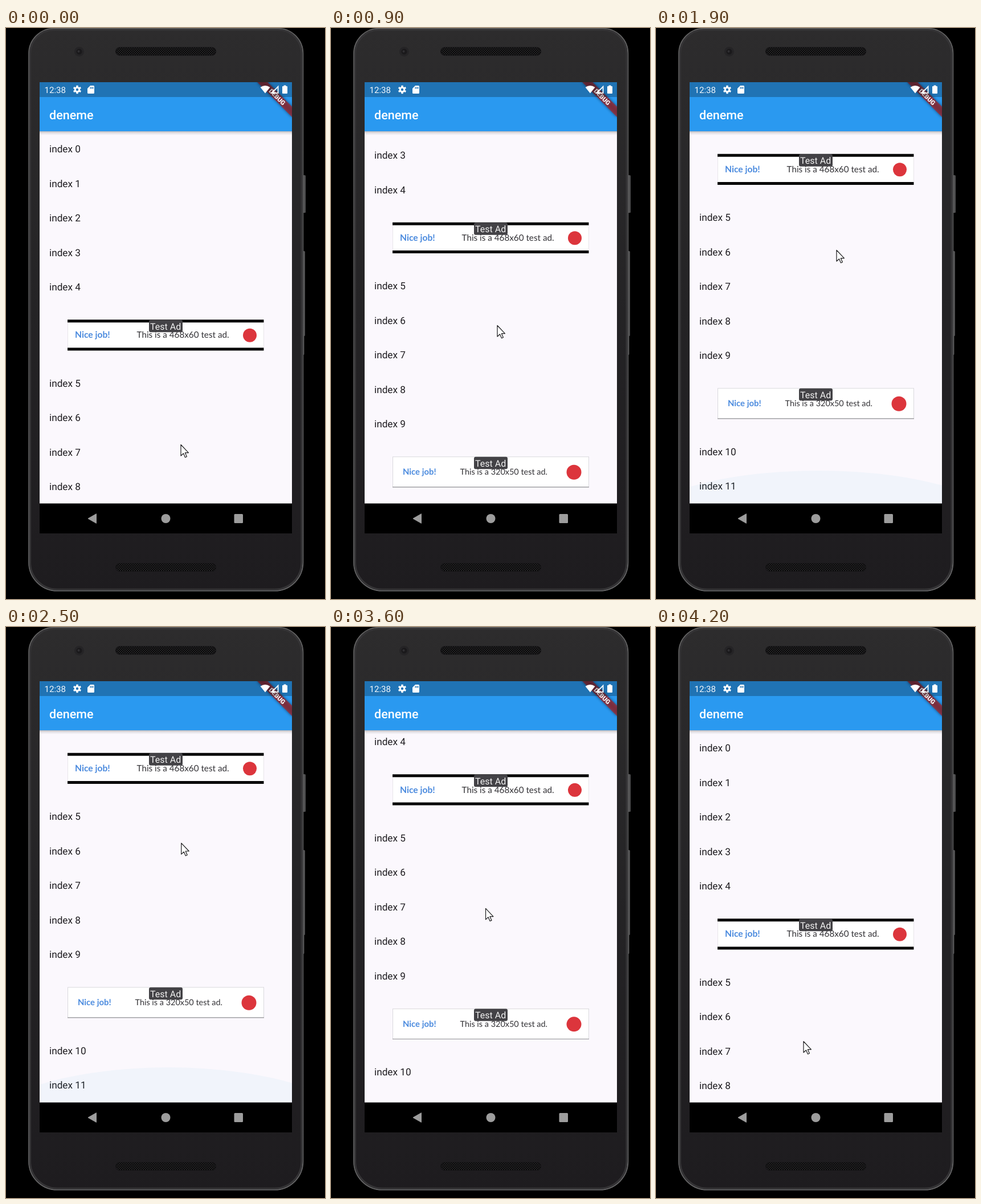
An HTML page that plays this animation: 560x1001 px, repeating every 4.3 s.

```html
<!DOCTYPE html>
<html lang="en">
<head>
<meta charset="utf-8">
<title>List with banner ads</title>
<style>
  html, body { margin: 0; width: 100%; height: 100%; overflow: hidden; background: #000; }
  svg { display: block; width: 560px; height: 1001px; }
  text { font-family: Roboto, sans-serif; text-rendering: geometricPrecision; }
  .row { font-size: 17.2px; fill: #1f1d21; }
  .ad text { font-family: Lato, sans-serif; fill: #333236; }
  .ad .nice { font-weight: 700; fill: #4a8ade; }
  .ad .tag { font: 16px Roboto, sans-serif; fill: #f2f2f2; }
</style>
</head>
<body>
<svg viewBox="0 0 560 1001">
  <defs>
    <linearGradient id="body" x2="0" y2="1">
      <stop offset="0" stop-color="#2d2c2d"/>
      <stop offset=".5" stop-color="#242325"/>
      <stop offset="1" stop-color="#1e1c1f"/>
    </linearGradient>
    <linearGradient id="rim" x2="0" y2="1">
      <stop offset="0" stop-color="#666"/>
      <stop offset=".5" stop-color="#555556"/>
      <stop offset="1" stop-color="#6c6c6d"/>
    </linearGradient>
    <linearGradient id="shade" x2="0" y2="1">
      <stop offset="0" stop-color="#000" stop-opacity=".26"/>
      <stop offset=".4" stop-color="#000" stop-opacity=".1"/>
      <stop offset="1" stop-color="#000" stop-opacity="0"/>
    </linearGradient>
    <pattern id="mesh" width="4" height="4" patternUnits="userSpaceOnUse">
      <rect width="4" height="4" fill="#252426"/>
      <circle cx="1" cy="1" r="1.15" fill="#060606"/>
      <circle cx="3" cy="3" r="1.15" fill="#060606"/>
    </pattern>
    <filter id="soft" x="-20%" y="-80%" width="140%" height="260%">
      <feGaussianBlur stdDeviation="2.4"/>
    </filter>
    <clipPath id="view"><rect x="59" y="181" width="443" height="652.500"/></clipPath>
    <clipPath id="screen"><rect x="59" y="95" width="443" height="791"/></clipPath>
  </defs>

  <rect width="560" height="1001"/>
  <g fill="#505051">
    <rect x="520" y="258" width="6" height="66" rx="1.500"/>
    <rect x="520" y="391" width="5" height="149" rx="1.500"/>
    <rect x="520" y="530" width="3.500" height="43" rx="1.500"/>
  </g>
  <path d="M84 1H478Q522 1 522 45V937Q522 987 472 987H90Q40 987 40 937V45Q40 1 84 1Z" fill="none"/>
  <path d="M84 .8h393.500a44 44 0 0 1 44 44v892a50 50 0 0 1-50 50h-381.500a50 50 0 0 1-50-50v-892a44 44 0 0 1 44-44z" fill="url(#body)" stroke="url(#rim)" stroke-width="1.600"/>
  <path d="M84 3.300h393.500a41.500 41.500 0 0 1 41.500 41.500v892a47.500 47.500 0 0 1-47.500 47.500h-381.500a47.500 47.500 0 0 1-47.500-47.500v-892a41.500 41.500 0 0 1 41.500-41.500z" fill="none" stroke="#353436" stroke-width="3"/>

  <circle cx="128.500" cy="41.500" r="8.500" fill="#252426"/>
  <circle cx="128.500" cy="41.500" r="5" fill="#1a191b"/>
  <circle cx="127.500" cy="41" r="2" fill="#302f32"/>
  <g fill="url(#mesh)" stroke="#151416" stroke-width="1.200">
    <rect x="192.500" y="34" width="176" height="14" rx="7"/>
    <rect x="192.500" y="938.500" width="176" height="14" rx="7"/>
  </g>

  <g clip-path="url(#screen)">
    <rect x="59" y="95" width="443" height="791"/>
    <rect x="59" y="181" width="443" height="652.500" fill="#fbf8fd"/>
    <g clip-path="url(#view)">
      <g id="list"></g>
      <ellipse id="glow" cx="285" rx="332" fill="#2196c0"/>
    </g>
    <rect x="59" y="181" width="443" height="7" fill="url(#shade)"/>
    <rect x="59" y="95" width="443" height="86" fill="#2a99f0"/>
    <text x="76" y="159.500" font-size="21.5" font-weight="500" fill="#fff">deneme</text>

    <g transform="translate(502 95) rotate(45)">
      <rect x="-43" y="30.200" width="86" height="12.900" fill="#000" opacity=".5" filter="url(#soft)"/>
      <rect x="-43" y="30.200" width="86" height="12.900" fill="#b71c1c" fill-opacity=".63"/>
      <text y="40.600" font-size="11" font-weight="900" text-anchor="middle" fill="#fff">DEBUG</text>
    </g>
    <rect x="59" y="95" width="443" height="26" fill="#000" fill-opacity=".25"/>

    <text x="67.500" y="114" font-size="15.1" fill="#f2f8fc">12:38</text>
    <g fill="#fff">
      <g id="gear" transform="translate(125 108)">
        <circle r="3.700" fill="none" stroke="#fff" stroke-width="3"/>
      </g>
      <path fill-rule="evenodd" d="M148 101h5.500q1.500 0 1.500 1.500v11q0 1.500-1.500 1.500h-9q-1.500 0-1.500-1.500v-7.500zM147.500 103.500v3h1.400v-3zM149.800 103.500v3h1.400v-3zM152 103.500v3h1.400v-3z"/>
      <path d="M446.500 104q8.500-6 17 0l-8.500 10.500z"/>
      <path fill-rule="evenodd" d="M478.500 100.500v14.500h-14zM476.700 105v8.200h-8z"/>
      <path d="M470.500 107v8h-6z"/>
      <path d="M487.500 100.500h4v1.500h1.500q1 0 1 1v11q0 1-1 1h-7q-1 0-1-1v-11q0-1 1-1h1.500z"/>
    </g>

    <g fill="#9d9d9d">
      <path d="M144 860l14.500-8.300v16.600z" stroke="#9d9d9d" stroke-linejoin="round"/>
      <circle cx="280.500" cy="860" r="8"/>
      <rect x="400.500" y="852" width="15.500" height="16" rx="1.500"/>
    </g>
  </g>

  <path id="cursor" d="M0 .5v19.500l4.500-4.200 3 6.900 2.900-1.200-3-6.800h6z" fill="#fff" stroke="#1c1c1e" stroke-width="1.200" stroke-linejoin="round"/>
</svg>
<script>
  const LOOP = 4300, STEP = 100, PITCH = 60.5, SLOT = 108;
  const $ = id => document.getElementById(id);

  // Rows: [time, value, ...]
  const scrollKeys = [[0, 0], [150, 0], [900, 170.5], [1300, 267], [1750, 290.5],
    [3350, 290.5], [3800, 194.6], [4200, 0], [4300, 0]];
  const cursorKeys = [[0, 307, 730], [900, 292, 521], [1300, 307, 450], [1900, 317, 389],
    [2400, 310, 378], [3200, 285, 396], [3800, 266, 564], [4200, 259, 726], [4300, 259, 726]];
  // Height and opacity of the overscroll glow
  const glowKeys = [[0, 0, 0], [1800, 0, 0], [1900, 58, .045], [2200, 72, .065],
    [2500, 62, .045], [3000, 0, 0], [4300, 0, 0]];

  // Monotone cubic interpolation of one column
  function sample(keys, t, col = 1) {
    let i = 0;
    while (i < keys.length - 2 && t >= keys[i + 1][0]) i++;
    const slope = k => (keys[k + 1][col] - keys[k][col]) / (keys[k + 1][0] - keys[k][0]);
    const tangent = k => {
      if (k === 0) return slope(0);
      if (k === keys.length - 1) return slope(k - 1);
      const a = slope(k - 1), b = slope(k);
      return a * b <= 0 ? 0 : 2 * a * b / (a + b);
    };
    const h = keys[i + 1][0] - keys[i][0], u = (t - keys[i][0]) / h;
    const s = u * u * (3 - 2 * u);
    return keys[i][col] * (1 - s) + keys[i + 1][col] * s
      + h * u * (1 - u) * ((1 - u) * tangent(i) - u * tangent(i + 1));
  }

  const frames = {
    '468x60': `<rect x="108" y="-27" width="345" height="54" fill="#fff"/>
      <path d="M108.500-22v44M452.500-22v44" stroke="#e8e6ea"/>
      <path d="M108-24.500h344.500M108 24.700h344.500" stroke="#050505" stroke-width="5"/>`,
    '320x50': `<rect x="108.500" y="-26.500" width="344" height="53" fill="#fff" stroke="#d9d9dd"/>
      <path d="M108 26.500h345" stroke="#a4a4a7" stroke-width="1.300"/>`
  };

  function ad(y, size, left, mid, font, dot, r) {
    return `<g class="ad" transform="translate(0 ${y})">${frames[size]}
      <text class="nice" x="${left}" y="5.200" font-size="${font + .4}">Nice job!</text>
      <text x="${mid}" y="5.200" font-size="${font}">This is a ${size} test ad.</text>
      <circle cx="${dot}" cy=".5" r="${r}" fill="#dc353c"/>
      <rect x="251" y="-26.500" width="59" height="21.500" rx="3" fill="#434246"/>
      <text class="tag" x="253" y="-9.500">Test Ad</text></g>`;
  }

  const rowY = i => 212 + i * PITCH + Math.floor(i / 5) * SLOT;
  const adY = i => rowY(i) + (PITCH + SLOT) / 2;
  $('list').innerHTML =
    Array.from({ length: 12 }, (_, i) =>
      `<text class="row" x="76" y="${rowY(i) + 6}">index ${i}</text>`).join('')
    + ad(adY(4), '468x60', 121, 229.5, 15.25, 428, 12)
    + ad(adY(9), '320x50', 126, 226.5, 14.45, 426.5, 13);

  $('gear').innerHTML += Array.from({ length: 6 }, (_, i) =>
    `<rect x="-1.700" y="-7.200" width="3.400" height="3.500" rx=".5" transform="rotate(${i * 60})"/>`).join('');

  function draw(t) {
    $('list').setAttribute('transform', `translate(0 ${-sample(scrollKeys, t)})`);
    $('cursor').setAttribute('transform',
      `translate(${sample(cursorKeys, t, 1)} ${sample(cursorKeys, t, 2)})`);
    const h = sample(glowKeys, t, 1), ry = h * 1.83, glow = $('glow');
    glow.setAttribute('ry', ry);
    glow.setAttribute('cy', 834 + ry - h);
    glow.setAttribute('opacity', sample(glowKeys, t, 2));
  }

  const start = performance.now();
  function tick() {
    const t = (performance.now() - start) % LOOP;
    draw(Math.floor(t / STEP) * STEP);
    requestAnimationFrame(tick);
  }
  tick();
</script>
</body>
</html>
```
